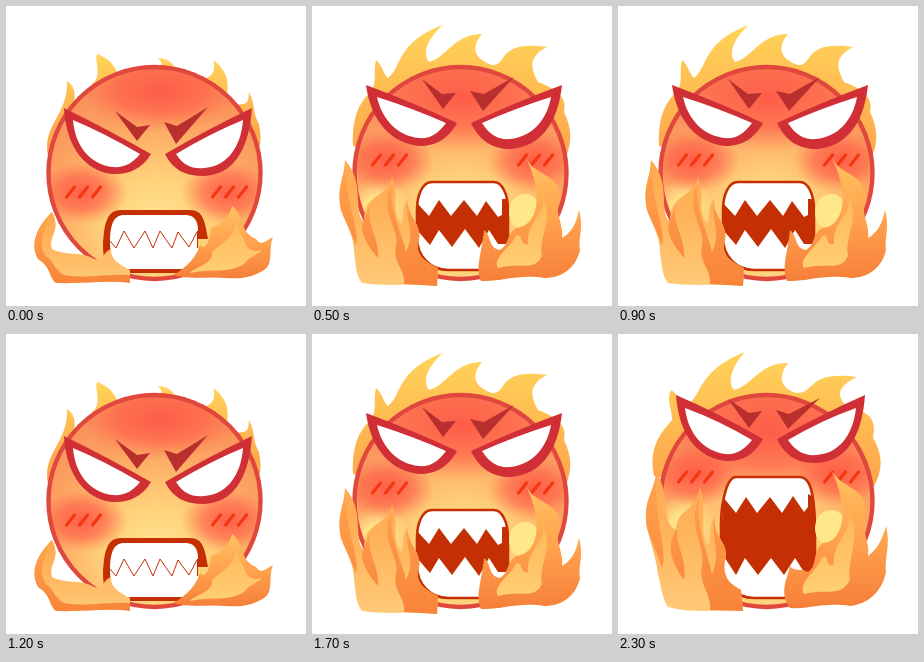
Recreate the animation shown at these times as an HTML page. Size 300 px wide and 300 px high, loop 2400 ms.

```html
<!DOCTYPE html>
<html lang="en">
<head>
<meta charset="utf-8">
<title>Angry burning face</title>
<style>
html, body { margin: 0; width: 100%; height: 100%; overflow: hidden; background: #fff; }
svg { display: block; width: 100vw; height: 100vh; }
</style>
</head>
<body>
<svg id="stage" viewBox="0 0 300 300">
  <defs>
    <radialGradient id="skin" gradientUnits="userSpaceOnUse" cx="150" cy="222" r="165">
      <stop offset="0" stop-color="#ffe694"/>
      <stop offset=".3" stop-color="#ffd27a"/>
      <stop offset=".62" stop-color="#fda864"/>
      <stop offset="1" stop-color="#f98a58"/>
    </radialGradient>
    <radialGradient id="glow">
      <stop offset="0" stop-color="#ff5345" stop-opacity=".88"/>
      <stop offset=".55" stop-color="#ff5a48" stop-opacity=".6"/>
      <stop offset="1" stop-color="#ff6a4c" stop-opacity="0"/>
    </radialGradient>
    <radialGradient id="shine">
      <stop offset="0" stop-color="#fff09a"/>
      <stop offset=".4" stop-color="#ffe88c" stop-opacity=".85"/>
      <stop offset="1" stop-color="#ffe08a" stop-opacity="0"/>
    </radialGradient>
    <linearGradient id="back" x1="0" y1="0" x2="0" y2="1">
      <stop offset="0" stop-color="#ffd45a"/>
      <stop offset=".4" stop-color="#ffbe52"/>
      <stop offset="1" stop-color="#fd9f4b"/>
    </linearGradient>
    <linearGradient id="leftHand" x1="0" y1="0" x2="0" y2="1">
      <stop offset="0" stop-color="#ffa850"/>
      <stop offset=".45" stop-color="#ffb45c"/>
      <stop offset="1" stop-color="#ffca78"/>
    </linearGradient>
    <linearGradient id="rightHand" x1="0" y1="0" x2="0" y2="1">
      <stop offset="0" stop-color="#ffc35e"/>
      <stop offset=".5" stop-color="#ffa24e"/>
      <stop offset="1" stop-color="#f67f3a"/>
    </linearGradient>
    <linearGradient id="tongue" x1="0" y1="0" x2="0" y2="1">
      <stop offset="0" stop-color="#ffb659"/>
      <stop offset="1" stop-color="#ffcf72"/>
    </linearGradient>
    <linearGradient id="ember" x1="0" y1="0" x2="0" y2="1">
      <stop offset="0" stop-color="#ffa64e"/>
      <stop offset="1" stop-color="#f8843a"/>
    </linearGradient>
    <clipPath id="disc"><circle cx="148.5" cy="167" r="106"/></clipPath>
  </defs>
</svg>
<script>
const STEP = 100;
const LIP = '#c43003';

const calm = {
  back: 'M84 80C98 70 88 58 91 48C102 52 108 58 112 68Z' +
    'M42 150C36 118 62 110 61 75C68 80 70 86 68 96Z' +
    'M152 52C164 53 168 58 169 64H150C158 60 156 56 152 52Z' +
    'M192 74C208 72 210 64 207 54C218 62 224 72 221 90Z' +
    'M228 98C244 100 242 94 243 86C250 100 246 106 253 118C256 134 254 140 252 146Z',
  brows: 'M109 105L131 121L144 119L131 135ZM202 101L171 120L158 116L170 138Z',
  eyes: 'M58 102Q99 122 145 148C136 164 120 169 106 168C80 165 60 142 58 102Z' +
    'M246 102Q204 122 159 148C168 166 182 170 198 170C226 169 243 146 246 102Z',
  whites: 'M67 114Q98 127 134 148C126 158 118 162 106 161C84 158 69 140 67 114Z' +
    'M237 114Q205 127 170 148C178 160 186 163 198 162C220 161 235 142 237 114Z',
  left: 'M46 206C30 222 24 238 32 253C46 262 42 270 50 277C75 278 100 274 124 277L124 264' +
    'C112 258 104 252 105 243C94 248 100 256 88 253C76 245 58 250 46 243C42 230 56 224 46 206Z',
  embers: 'M46 206C30 222 24 238 32 253C46 262 42 270 50 277C75 278 100 274 124 277L124 269' +
    'C100 268 80 273 58 269C48 263 48 256 40 250C32 240 36 226 46 206Z',
  right: 'M226 200C240 210 232 225 250 233C255 240 258 236 267 231C262 244 268 258 258 264' +
    'C245 272 235 273 220 272C200 270 185 274 167 269C180 262 190 252 194 239' +
    'C200 245 203 236 205 222C212 220 222 215 226 200Z',
  tongues: 'M228 212C234 226 218 236 206 246C208 258 190 260 184 267C206 262 222 268 238 258' +
    'C244 250 250 250 256 244C240 248 240 236 236 230Z',
  cheekY: 187, markY: 186, topGlow: [155, 86, 82, 40]
};

const half = {
  back: 'M41 140C40 112 46 98 60 84C65 74 61 66 64 54C71 60 70 66 76 72C90 62 84 36 131 19' +
    'C118 30 109 46 117 56C134 52 142 28 170 28C160 40 160 52 180 59C196 60 184 34 235 41' +
    'C214 52 220 64 226 76C242 82 256 90 252 106C260 122 260 138 254 150L148 167Z',
  brows: 'M110 73L130 88L144 87L131 103ZM202 71L172 88L158 85L171 105Z',
  eyes: 'M54 79Q100 96 145 117C136 134 122 140 108 140C80 138 59 116 54 79Z' +
    'M250 79Q204 96 159 117C168 136 182 143 198 143C228 141 246 118 250 79Z',
  whites: 'M65 91Q100 102 134 117C126 128 118 133 107 132C86 130 70 114 65 91Z' +
    'M239 91Q204 102 170 117C178 130 188 134 198 133C220 131 235 114 239 91Z',
  left: 'M33 154C33 172 24 180 29 204C36 222 42 232 42 246C44 260 44 270 50 277' +
    'C75 281 100 277 125 280L126 262C114 256 102 250 107 234C110 216 94 210 96 193' +
    'C88 202 94 212 89 218C78 204 88 190 80 171C74 194 52 186 52 216C40 204 54 178 33 154Z',
  embers: 'M33 154C33 172 24 180 29 204C34 218 40 226 44 240C48 222 34 200 33 154Z' +
    'M80 176C66 206 88 222 84 240C80 256 94 264 92 278L125 280L126 262' +
    'C114 256 102 250 107 234C110 216 94 210 96 193C92 214 104 226 94 246C90 226 76 204 80 176Z' +
    'M60 196C50 214 68 230 66 252C56 240 46 226 52 214Z',
  right: 'M214 152C224 172 250 166 247 196C243 210 252 218 250 232C260 226 264 218 267 204' +
    'C272 222 266 232 268 244C264 262 250 272 232 272C205 268 190 276 169 275' +
    'C163 262 170 246 172 224C180 230 176 242 188 244C198 238 194 228 204 222' +
    'C226 220 232 190 214 152Z',
  tongues: 'M229 190C238 206 214 214 216 238C206 240 212 226 204 230C198 242 180 252 186 262' +
    'C210 256 222 266 230 250C226 230 244 210 229 190Z',
  lip: 'M120 176H182C190 176 196 188 196 204V246C196 258 184 264 172 264H136' +
    'C118 264 105 250 105 232V204C105 190 110 176 120 176Z',
  gap: 'M105 197L117 210L127 194L139 210L152 194L165 210L174 195L186 211L190 209L190 193' +
    'L196 193L196 238L186 238L177 224L167 242L153 223L140 241L127 224L118 239L105 224Z',
  cheekY: 155, markY: 154, topGlow: [150, 92, 105, 54], shineY: 206
};

const wide = {
  back: 'M36 142C30 112 44 98 54 86C54 74 48 66 53 56C62 62 62 68 70 70C84 62 80 36 127 18' +
    'C116 30 108 46 116 56C134 52 142 28 170 29C160 42 162 54 178 59C198 60 188 36 239 43' +
    'C216 54 220 64 230 74C246 76 260 82 255 104C266 122 264 138 256 152L148 167Z',
  brows: 'M110 65L131 79L144 77L131 94ZM202 64L171 80L158 76L170 95Z',
  eyes: 'M58 61Q102 80 145 105C136 122 122 128 108 127C80 124 61 102 58 61Z' +
    'M247 61Q204 80 159 105C168 124 182 129 198 129C226 128 244 106 247 61Z',
  whites: 'M67 74Q100 86 134 106C126 116 118 121 107 120C86 117 70 100 67 74Z' +
    'M238 74Q204 86 170 106C178 118 188 122 198 121C220 120 235 102 238 74Z',
  left: 'M38 137C38 156 24 166 29 194C34 214 38 224 40 240C44 256 44 264 50 273' +
    'C75 280 100 275 125 277L123 256C112 250 104 244 107 226C112 208 94 204 97 182' +
    'C89 194 95 206 90 212C80 198 90 176 82 153C76 182 60 172 58 196C42 188 54 164 38 137Z',
  embers: 'M38 137C38 156 24 166 29 194C34 210 40 220 44 234C50 214 36 190 38 137Z' +
    'M82 160C68 192 88 212 84 232C80 250 94 260 92 276L125 277L123 256' +
    'C112 250 104 244 107 226C112 208 94 204 97 182C92 204 104 218 94 240C90 218 76 192 82 160Z' +
    'M62 184C52 204 70 222 66 246C56 232 48 216 56 200Z',
  right: 'M213 136C224 156 252 152 247 184C243 198 252 206 250 222C260 214 264 206 268 192' +
    'C273 212 266 224 268 238C264 258 250 270 232 272C205 268 190 276 172 274' +
    'C160 258 170 244 172 232C176 238 182 234 190 238C200 232 194 216 205 209' +
    'C226 208 232 174 213 136Z',
  tongues: 'M229 178C238 196 214 206 216 230C206 236 212 218 204 224C198 238 180 248 186 260' +
    'C210 254 222 264 232 246C228 224 246 200 229 178Z',
  lip: 'M118 143H182C192 143 196 158 197 190V246C196 258 184 264 172 264H136' +
    'C118 264 103 250 103 226V190C103 172 108 143 118 143Z',
  gap: 'M105 163L118 179L128 163L139 179L152 163L164 179L175 162L186 178L190 173L190 160' +
    'L196 163L197 238L186 238L177 224L166 241L153 224L140 241L127 224L118 241L103 218Z',
  cheekY: 141, markY: 143, topGlow: [150, 98, 112, 64], shineY: 194
};

// Blend two poses whose paths share the same commands.
const lerp = (a, b, k) => a + (b - a) * k;
function blend(a, b, k) {
  if (Array.isArray(a)) return a.map((v, i) => lerp(v, b[i], k));
  if (typeof a === 'number') return lerp(a, b, k);
  const other = b.match(/[\d.]+/g);
  let i = 0;
  return a.replace(/[\d.]+/g, n => lerp(+n, +other[i++], k).toFixed(1));
}
const between = {};
for (const key in half) between[key] = blend(half[key], wide[key], 0.5);
between.reach = 1.1;

const path = (d, fill, extra = '') => `<path d="${d}" fill="${fill}" ${extra}/>`;
const blob = (x, y, rx, ry, fill = 'url(#glow)') =>
  `<ellipse cx="${x}" cy="${y}" rx="${rx}" ry="${ry}" fill="${fill}"/>`;

function marks(y) {
  const d = [64, 77, 90, 210, 223, 236].map(x => `M${x + 4.5} ${y - 5}l-8 10`).join('');
  return path(d, 'none', 'stroke="#f5360f" stroke-width="3.2" stroke-linecap="round"');
}

function mouth(p) {
  if (p.lip) {
    return path(p.lip, '#fff') + path(p.gap, LIP) +
      path(p.lip, 'none', `stroke="${LIP}" stroke-width="2.6"`);
  }
  return path('M97 240C98 215 102 204 115 204H184C197 204 199 215 202 233H192V252' +
      'Q190 267 178 267H115C104 267 97 258 97 240Z', LIP) +
    path('M104 236C104 218 108 209 118 209H180C190 209 192 218 192 224V250' +
      'Q190 263 178 263H118C108 263 104 252 104 236Z', '#fff') +
    path('M104 235L110 242L118 225L128 242L139 225L147 242L154 225L166 242L172 226' +
      'L183 241L191.5 225V242', 'none', `stroke="${LIP}" stroke-width="1"`);
}

function draw(p) {
  const reach = p.reach || 1;
  const stretch = `transform="translate(${170 * (1 - reach)} 0) scale(${reach} 1)"`;
  const shine = p.shineY ? blob(66, p.shineY - 4, 34, 30, 'url(#shine)') : '';
  const spark = p.shineY ? blob(213, p.shineY, 16, 18, '#ffe88c') : '';
  return path(p.back, 'url(#back)') +
    '<circle cx="148.5" cy="167" r="106" fill="url(#skin)"/>' +
    `<g clip-path="url(#disc)">${shine}${blob(...p.topGlow)}` +
    blob(76, p.cheekY, 46, 31) + blob(221, p.cheekY, 46, 31) + '</g>' +
    '<circle cx="148.5" cy="167" r="106" fill="none" stroke="#e0483d" stroke-width="4.4"/>' +
    path(p.brows, '#b92f2d') + path(p.eyes, '#d02f35') + path(p.whites, '#fff') +
    marks(p.markY) + mouth(p) + spark +
    path(p.left, 'url(#leftHand)') + path(p.embers, 'url(#ember)') +
    path(p.right, 'url(#rightHand)', stretch) + path(p.tongues, 'url(#tongue)', stretch);
}

const stage = document.getElementById('stage');
const layers = [calm, half, between, wide].map(p => {
  const g = document.createElementNS('http://www.w3.org/2000/svg', 'g');
  g.innerHTML = draw(p);
  stage.append(g);
  return g;
});

const start = performance.now();
function tick() {
  const now = Math.floor((performance.now() - start) / STEP) % layers.length;
  layers.forEach((g, i) => { g.style.display = i === now ? '' : 'none'; });
  requestAnimationFrame(tick);
}
tick();
</script>
</body>
</html>
```
